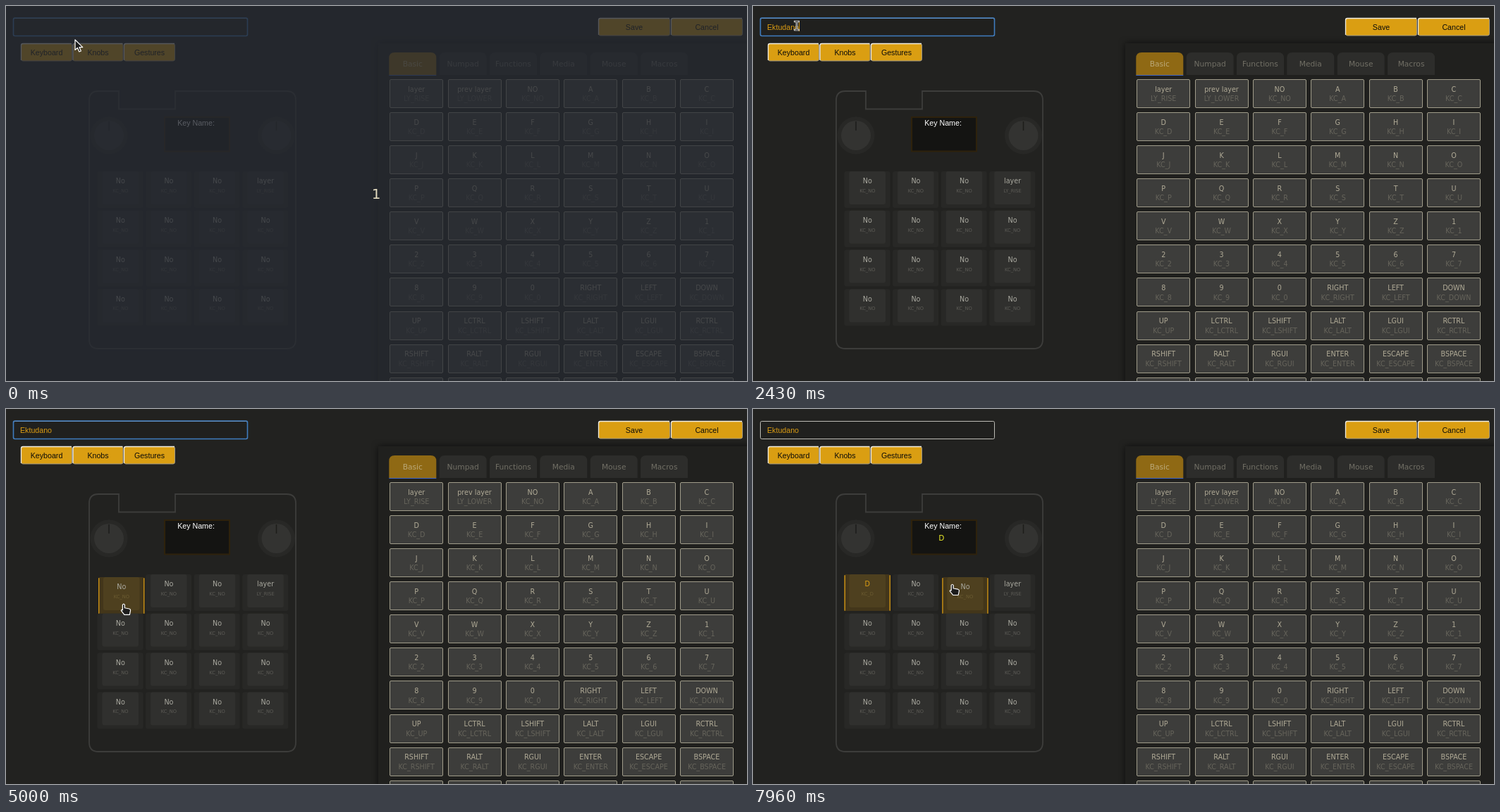
An HTML page for the animation above (8000 ms loop, 1051x533 px).

```html
<!DOCTYPE html>
<html lang="en">
<head>
<meta charset="utf-8">
<title>Keypad editor</title>
<style>
  html, body { margin: 0; width: 100%; height: 100%; overflow: hidden; background: #222220; }
  svg { display: block; width: 1051px; height: 533px; }
  text { font: 9.6px "DejaVu Sans", sans-serif; text-anchor: middle; white-space: pre; }
  .ui { font: 10.67px "Liberation Sans", Arial, sans-serif; }
  .tab { font-size: 10.67px; }
  .button { fill: #da9e12; stroke: #a39a82; }
  .lit { fill: none; stroke: #f0ece0; stroke-width: 1.3; }
  .cell rect { fill: #3d3d3b; stroke: #a09c8a; }
  .cell text { fill: #b0aa96; }
  .cell .code { fill: #66645b; }
  .cell.hover rect { stroke: #e6e4dc; }
  .key .base { fill: #282826; }
  .key .cap { fill: #30302e; }
  .key .edge { fill: none; }
  .key text { fill: #a9a89f; }
  .key .code { font-size: 6.7px; fill: #5d5c57; }
  .key.hover .base, .key.on .base { fill: #43361a; }
  .key.hover .cap, .key.on .cap { fill: #4e401f; }
  .key.hover .edge, .key.on .edge { fill: #c48c14; }
  .key.hover .code, .key.on .code { fill: #6c5c32; }
  .key.on .label { fill: #d99b14; }
  .pointer { fill: #1c1c1c; stroke: #fff; stroke-width: 1.2; stroke-linejoin: round; }
</style>
</head>
<body>
<svg id="stage" viewBox="0 0 1051 533"></svg>
<script>
const LOOP = 8000;
const NAME = 'Ektudano';
const stage = document.getElementById('stage');

function add(parent, tag, attrs = {}, text) {
  const node = document.createElementNS('http://www.w3.org/2000/svg', tag);
  for (const k in attrs) node.setAttribute(k, attrs[k]);
  if (text !== undefined) node.textContent = text;
  parent.append(node);
  return node;
}
const box = (parent, x, y, width, height, attrs) =>
  add(parent, 'rect', { x, y, width, height, ...attrs });
const label = (parent, x, y, text, attrs) => add(parent, 'text', { x, y, ...attrs }, text);
const within = (p, x, y, w, h) => p.x >= x && p.x < x + w && p.y >= y && p.y < y + h;

// Right panel with tabs and the grid of key codes
box(stage, 528, 53, 540, 500, { fill: '#20201e', style: 'filter:drop-shadow(0 0 5px #0009)' });
['Basic', 'Numpad', 'Functions', 'Media', 'Mouse', 'Macros'].forEach((name, i) => {
  const x = 543.3 + i * 71.35;
  add(stage, 'path', {
    d: `M${x} 98V74q0-8 8-8h51q8 0 8 8V98z`, fill: i ? '#2d2d2b' : '#8f6914'
  });
  label(stage, x + 33.5, 86, name, { class: 'tab', fill: i ? '#716f65' : '#baa878' });
});
box(stage, 543.3, 98, 67, 1, { fill: '#3f63c4' });

const codes = [
  ['layer', 'LY_RISE'], ['prev layer', 'LY_LOWER'],
  ...['NO', ...'ABCDEFGHIJKLMNOPQRSTUVWXYZ1234567890', 'RIGHT', 'LEFT', 'DOWN', 'UP',
    'LCTRL', 'LSHIFT', 'LALT', 'LGUI', 'RCTRL', 'RSHIFT', 'RALT', 'RGUI',
    'ENTER', 'ESCAPE', 'BSPACE'].map(c => [c, 'KC_' + c]),
  ...Array(6).fill(['', ''])
];
const cells = codes.map(([name, code], i) => {
  const x = 544.2 + (i % 6) * 82.35, y = 104.2 + Math.floor(i / 6) * 47.05;
  const g = add(stage, 'g');
  box(g, Math.round(x) + .5, Math.round(y) + .5, 75, 40, { rx: 1.5 });
  label(g, x + 38, y + 17.6, name);
  label(g, x + 38, y + 31, code, { class: 'code' });
  return { g, x, y, w: 76, h: 41, type: 'cell', dx: 1, dy: .7 };
});

// Device
add(stage, 'path', {
  d: 'M131 121H160V146.5H240V121H398q13 0 13 13V474q0 13-13 13H131q-13 0-13-13V134q0-13 13-13z',
  fill: 'none', stroke: '#3d3d3b', 'stroke-width': 1.8
});
for (const cx of [146, 383.5]) {
  add(stage, 'circle', { cx, cy: 184, r: 26.5, fill: '#282826' });
  add(stage, 'circle', { cx, cy: 184, r: 21, fill: '#333331' });
  box(stage, cx - .75, 164, 1.5, 13, { fill: '#1d1d1b' });
}
box(stage, 225, 158, 92, 48.5, { fill: '#141412', stroke: '#2e220c', 'stroke-width': 2 });
label(stage, 269.5, 170.3, 'Key Name:', { class: 'ui', fill: '#fff' });
const keyName = label(stage, 267.3, 187.3, '', { class: 'ui', fill: '#f5f52a' });

const keys = Array.from({ length: 16 }, (_, i) => {
  const x = 129.5 + (i % 4) * 68.6, y = 235 + Math.floor(i / 4) * 55.8;
  const g = add(stage, 'g');
  box(g, x, y, 65, 52, { class: 'base', rx: 3 });
  box(g, x + 7, y, 51.5, 47, { class: 'cap', rx: 3 });
  for (const ex of [0, 64]) box(g, x + ex, y + 1, 1.5, 51, { class: 'edge', rx: .7 });
  const name = label(g, x + 32.8, y + 17.4, i === 3 ? 'layer' : 'No', { class: 'label' });
  const code = label(g, x + 32.8, y + 30, i === 3 ? 'LY_RISE' : 'KC_NO', { class: 'code' });
  return { g, x, y, w: 65, h: 52, type: 'key', dx: 1.5, dy: 4, name, code };
});

// Top bar
box(stage, 10.5, 17.5, 332, 25, { rx: 2, fill: '#20201e', stroke: '#bdbcb5' });
const focusRing = box(stage, 10.5, 17, 332, 25.5, {
  rx: 2, fill: 'none', stroke: '#3f7cbf', 'stroke-width': 1.6
});
const typed = label(stage, 20, 33.7, '', {
  class: 'ui', fill: '#d99b14', style: 'text-anchor:start'
});
const caret = box(stage, 19, 23, 1, 13, { fill: '#d99b14' });

const buttons = [
  ['Keyboard', 21, 53, 73], ['Knobs', 94.5, 53, 72], ['Gestures', 167, 53, 73],
  ['Save', 840, 17, 102], ['Cancel', 943, 17, 102]
].map(([name, x, y, w]) => {
  box(stage, x + .5, y + .5, w - 1, 24.5, { class: 'button', rx: 2.5 });
  add(stage, 'path', { class: 'lit', d: `M${x + .5} ${y + 24}v-21q0-2.500 2.500-2.500h${w - 4}` });
  label(stage, x + w / 2, y + 16.8, name, { class: 'ui', fill: '#0c0c0a' });
  return { x, y, w, h: 25 };
});

// Countdown cover
const cover = add(stage, 'g');
box(cover, 0, 0, 1051, 533, { fill: '#252931', opacity: .76 });
label(cover, 525, 274, '1', { fill: '#e4dcc0', style: 'font-size:20px' });

// Pointers, each drawn around its hot spot
const pointers = {
  arrow: add(stage, 'path', {
    class: 'pointer', d: 'M0 0V14.5L3.4 11.4 5.8 17 8.4 16 6 10.6H10.8z'
  }),
  hand: add(stage, 'path', {
    class: 'pointer',
    d: 'M-1.8 1.5Q-.3-1 1.2 1.5V6L7.700 7.200Q9.700 7.800 9.400 9.500L8.200 15.500H.7L-3.800 9.800Q-3.300 7.800-1.800 9z'
  }),
  beam: add(stage, 'g')
};
for (const [stroke, width] of [['#fff', 2.6], ['#1c1c1c', 1]])
  add(pointers.beam, 'path', {
    d: 'M-2.5-6H2.5M-2.5 6H2.5M0-6V6', stroke, 'stroke-width': width, 'stroke-linecap': 'square'
  });

// Pointer path: time, x, y
const path = [
  [0, 98, 48], [350, 98, 48], [480, 92, 84], [600, 72, 58], [690, 63.5, 33], [740, 63.5, 33],
  [870, 62, 28], [3180, 62, 28], [3430, 119, 45], [3540, 119, 45], [3570, 119, 46],
  [3700, 119, 46], [3830, 90, -22], [3960, 88, -22], [4000, 86, 4], [4160, 70, 52],
  [4260, 73, 62], [4300, 74, 64], [4500, 110, 125], [4780, 180, 234], [4830, 178, 243],
  [4980, 168, 278], [5170, 160.5, 267], [6260, 160.5, 267], [6480, 560, 196], [6600, 690, 183],
  [6760, 650, 174], [6910, 591, 170], [7000, 580, 173], [7090, 580, 173], [7220, 576, 174],
  [7740, 576, 174], [7960, 283, 249], [8000, 283, 249]
];
function pointerAt(t) {
  const i = path.findIndex(p => p[0] > t);
  const [t0, x0, y0] = path[i - 1], [t1, x1, y1] = path[i];
  const k = (t - t0) / (t1 - t0);
  return { x: x0 + (x1 - x0) * k, y: y0 + (y1 - y0) * k };
}

function typedCount(t) {
  if (t < 1650) return 0;
  if (t < 1910) return 1;
  return Math.min(NAME.length, 2 + Math.floor((t - 1910) / 86.6));
}

function draw(t) {
  cover.setAttribute('opacity', t < 40 ? 1 : t < 90 ? .3 : 0);

  typed.textContent = NAME.slice(0, typedCount(t));
  const caretOn = (t >= 870 && t < 1040) || (t >= 1650 && t < 3300);
  caret.setAttribute('opacity', caretOn ? 1 : 0);
  caret.setAttribute('x', typedCount(t) ? Math.round(20 + typed.getComputedTextLength()) : 19);
  focusRing.setAttribute('opacity', Math.max(0, Math.min(1, (5910 - t) / 130)));

  const selected = t >= 5780, assigned = t >= 7430;
  keyName.textContent = assigned ? 'D' : selected ? 'No' : '';
  keys[0].name.textContent = assigned ? 'D' : 'No';
  keys[0].code.textContent = assigned ? 'KC_D' : 'KC_NO';

  const p = pointerAt(t);
  let kind = within(p, 11, 17, 331, 25) ? 'beam' : 'arrow';
  if (buttons.some(b => within(p, b.x, b.y, b.w, b.h))) kind = 'hand';
  for (const c of [...cells, ...keys]) {
    const hover = within(p, c.x, c.y, c.w, c.h);
    const on = c === keys[0] && selected;
    if (hover) kind = 'hand';
    c.g.setAttribute('class', c.type + (hover ? ' hover' : '') + (on ? ' on' : ''));
    c.g.setAttribute('transform', hover ? `translate(${c.dx} ${c.dy})` : '');
  }
  for (const k in pointers) {
    pointers[k].setAttribute('visibility', k === kind ? 'visible' : 'hidden');
    pointers[k].setAttribute('transform', `translate(${p.x} ${p.y})`);
  }
}

const start = performance.now();
function tick() {
  draw((performance.now() - start) % LOOP);
  requestAnimationFrame(tick);
}
tick();
</script>
</body>
</html>
```
